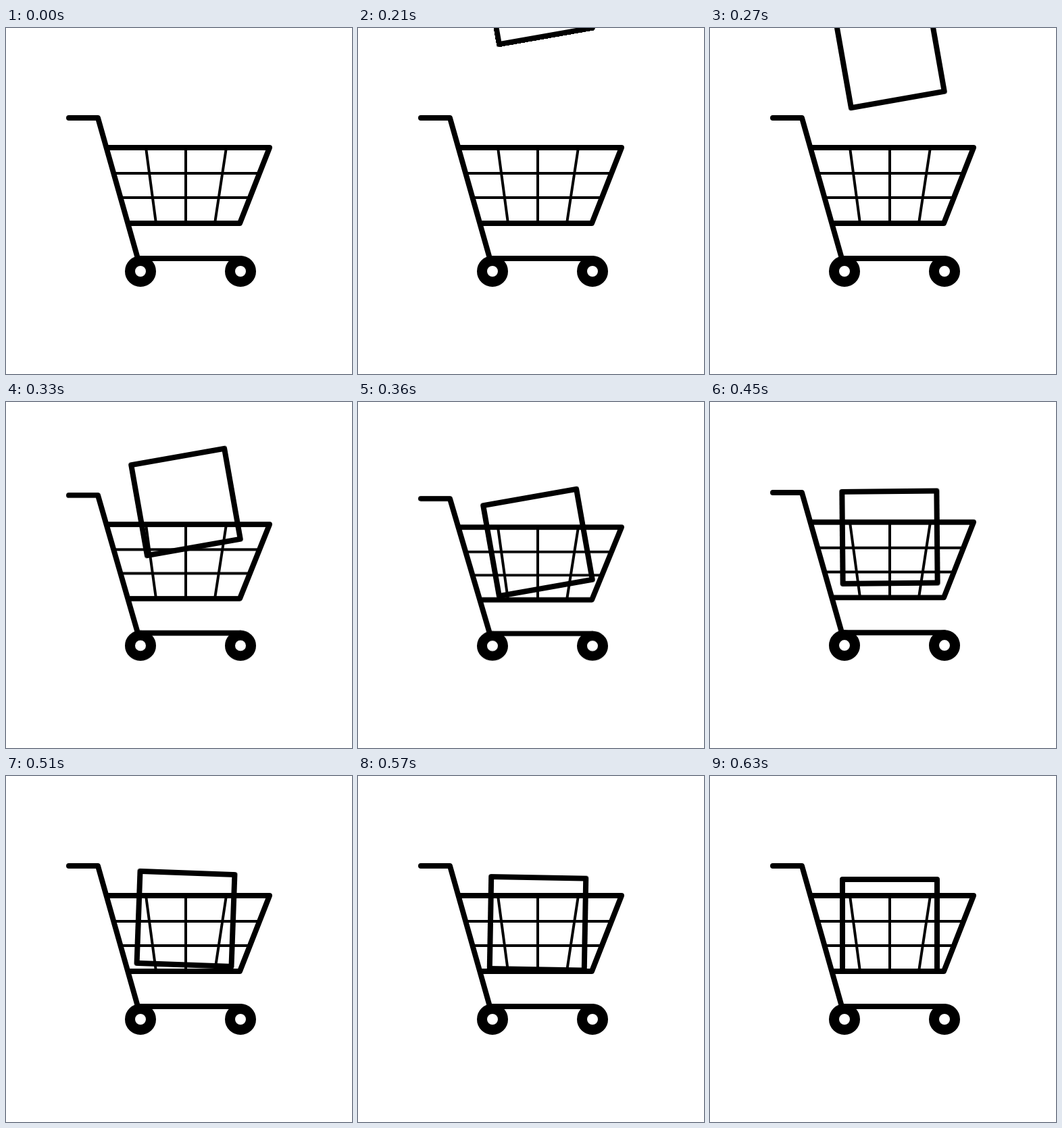
These frames come from a looping animation (512x512 px, 2.25 s). An HTML page:

```html
<!DOCTYPE html>
<html lang="en">
<head>
<meta charset="utf-8">
<title>Box drops into a cart</title>
<style>
  html, body { margin: 0; width: 100%; height: 100%; overflow: hidden; background: #fff; }
  svg { display: block; width: 100vw; height: 100vh; }
  path, rect, circle { fill: none; stroke: #000; stroke-width: 8; stroke-linecap: round; stroke-linejoin: round; }
  .grid { stroke-width: 4; stroke-linecap: butt; }
  .wheel { stroke-width: 15; }

  .cart, .box, .tilt { animation: 2250ms step-end infinite; }
  .cart { transform-origin: 266px 383px; animation-name: squash; }
  .box { animation-name: fall; }
  .tilt { transform-origin: 266px 221px; animation-name: tilt; }

  /* One 30 ms step is 1.333% of the loop. */
  @keyframes fall {
    0%      { transform: translateY(-420px); }
    9.333%  { transform: translateY(-276px); }
    10.666% { transform: translateY(-231px); }
    12%     { transform: translateY(-182px); }
    13.333% { transform: translateY(-129px); }
    14.666% { transform: translateY(-73px); }
    16%     { transform: translateY(-13px); }
    17.333% { transform: translateY(-23.5px); }
    18.666% { transform: translateY(-28.4px); }
    20%     { transform: translateY(-20.8px); }
    21.333% { transform: translateY(-14.2px); }
    22.666% { transform: translateY(-9.6px); }
    24%     { transform: translateY(-5.7px); }
    25.333% { transform: translateY(-2.7px); }
    26.666% { transform: translateY(-.8px); }
    28%, 100% { transform: translateY(0); }
  }
  @keyframes tilt {
    0%      { transform: rotate(-10deg); }
    16%     { transform: rotate(-10deg); animation-timing-function: steps(4); }
    21.333% { transform: rotate(2.6deg); animation-timing-function: steps(5); }
    28%, 100% { transform: rotate(0deg); }
  }
  @keyframes squash {
    0%      { transform: scaleY(1); }
    13.333% { transform: scaleY(1); animation-timing-function: steps(2); }
    16%     { transform: scaleY(.96); animation-timing-function: steps(3); }
    20%     { transform: scaleY(.996); }
    21.333%, 100% { transform: scaleY(1); }
  }
</style>
</head>
<body>
<svg viewBox="0 0 512 512">
  <g class="cart">
    <path class="grid" d="M207 177 222 289M266 177V289M326 177 309 289M160 215H375M170 251H361"/>
    <path d="M93 133H136L195 341H347"/>
    <path d="M150 177H390L346 289H182"/>
    <circle class="wheel" cx="199" cy="360" r="15.5"/>
    <circle class="wheel" cx="347" cy="360" r="15.5"/>
  </g>
  <g class="box">
    <rect class="tilt" x="196" y="153" width="140" height="136"/>
  </g>
</svg>
</body>
</html>
```
